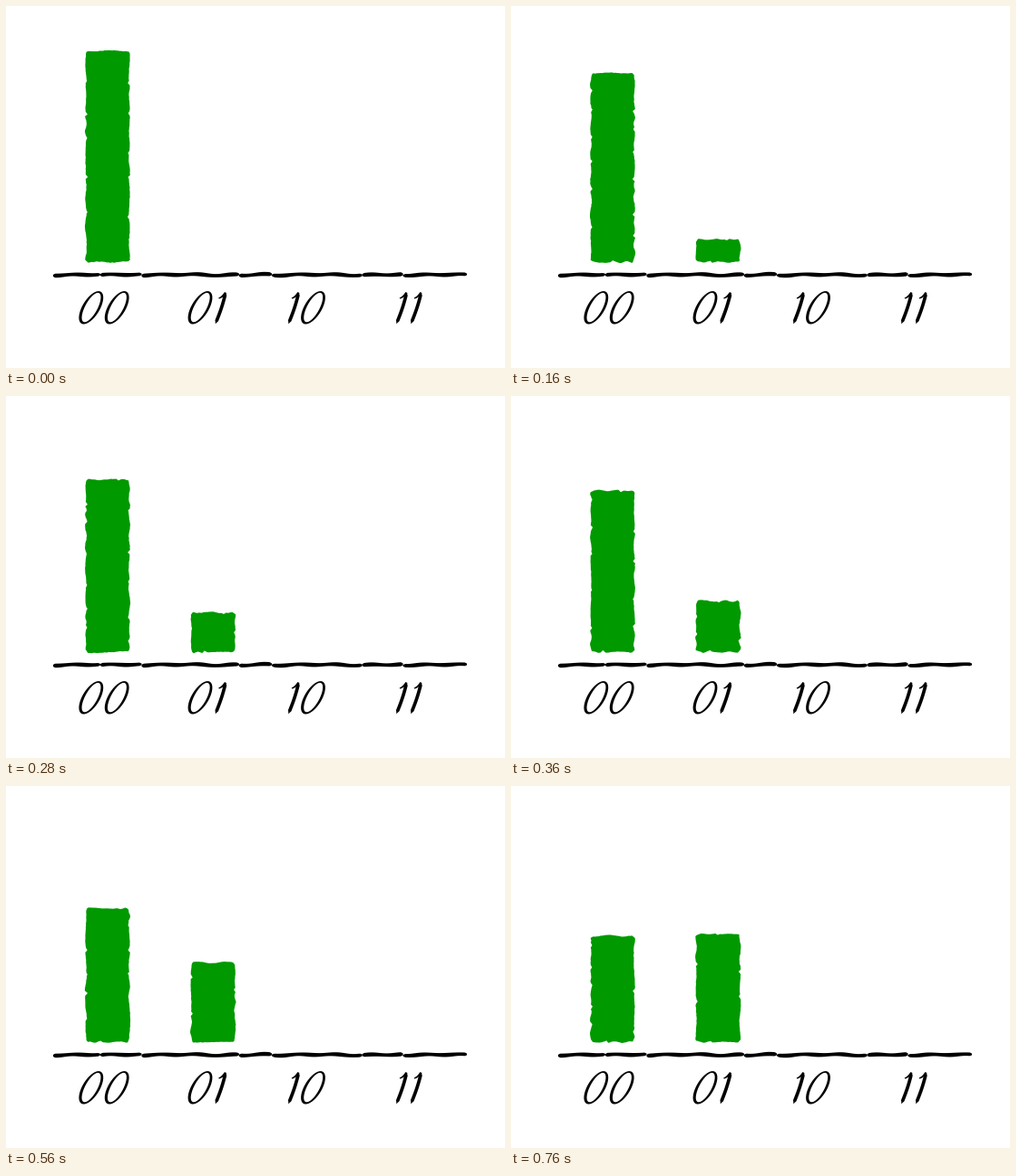
A matplotlib script that plays this animation: 550x400 px, repeating every 2400 ms.

```python
import numpy as np
import matplotlib.pyplot as plt
from matplotlib.animation import FuncAnimation
from matplotlib.patches import PathPatch, Polygon
from matplotlib.path import Path

W, H, DPI = 550, 400, 100
FRAMES, STEP_MS, LAST = 60, 40, 19
GREEN, INK = "#009900", "#000000"
BASE = 283

fig = plt.figure(figsize=(W / DPI, H / DPI), dpi=DPI, facecolor="white")
ax = fig.add_axes([0, 0, 1, 1])
ax.set_xlim(0, W)
ax.set_ylim(H, 0)
ax.axis("off")


def brush(x, y, width):
    """Fill a stroke of varying width along a centre line."""
    dx, dy = np.gradient(x), np.gradient(y)
    n = np.hypot(dx, dy)
    ox, oy = -dy / n * width / 2, dx / n * width / 2
    left = np.column_stack([x + ox, y + oy])
    right = np.column_stack([x - ox, y - oy])[::-1]
    ax.add_patch(Polygon(np.vstack([left, right]), fc=INK, lw=0))


def draw_axis():
    rng = np.random.default_rng(4)
    stops = [52, 104, 149.5, 257, 293, 392.5, 437.5, 508]
    for a, b in zip(stops, stops[1:]):
        x = np.linspace(a, b, 60)
        p, q = rng.uniform(0, 2 * np.pi, 2)
        y = 297 + 0.6 * np.sin(x / 6.5 + p) + 0.4 * np.sin(x / 13 + q)
        edge = np.minimum(x - a, b - x)
        width = 4.1 * np.clip(0.45 + edge / 4, 0, 1) + 0.4 * np.sin(x / 5 + q)
        brush(x, y, width)


def zero(cx):
    t = np.linspace(0, 2 * np.pi, 90)
    c, s = np.cos(t), np.sin(t)

    def ring(a, b, slant, dx, dy):
        return np.column_stack([cx + dx + a * c + slant * s, 333.3 + dy - b * s])

    outer = ring(10.6, 18.2, 8.2, 0, 0)
    inner = ring(7.5, 16.2, 7.3, 0.2, -0.2)[::-1]
    path = Path.make_compound_path(Path(outer, closed=True), Path(inner, closed=True))
    ax.add_patch(PathPatch(path, fc=INK, lw=0))


def one(x0):
    t = np.linspace(0, 1, 40)
    ends = np.clip(np.minimum(t, 1 - t) * 12, 0.3, 1)
    brush(x0 + 2 + 11.2 * t + 0.8 * np.sin(np.pi * t), 350.7 - 34 * t, 3.7 * ends)
    brush(x0 + 13 - 7.5 * t, 316.8 + 6.2 * t + np.sin(np.pi * t), 2.6 * (1 - 0.5 * t))


def side(rng, length):
    """Position along an edge and its inward offset, with nicks between strokes."""
    pos, off, start = [], [], 0.0
    while start < length:
        end = start + rng.uniform(18, 46)
        if length - end < 9:
            end = length
        n = max(5, int((end - start) / 2))
        u = np.linspace(0, 1, n)
        waves = rng.uniform(0.6, 1.8)
        wob = rng.uniform(0.3, 1.0) * np.sin(2 * np.pi * (waves * u + rng.random()))
        wob += rng.normal(0, 0.15, n)
        wob[[0, -1]] = rng.uniform(0.8, 2.0, 2)
        pos.append(start + 0.4 + (end - start - 0.8) * u)
        off.append(wob)
        start = end
    return np.concatenate(pos), np.concatenate(off)


def rough_bar(left, right, top, seed):
    rng = np.random.default_rng(seed)
    w, h = right - left, BASE - top
    k = min(1, h / 10)
    p, o = side(rng, w)
    up = np.column_stack([left + p, top + k * o])
    p, o = side(rng, h)
    rt = np.column_stack([right - o, top + p])
    p, o = side(rng, w)
    dn = np.column_stack([right - p, BASE - k * o])
    p, o = side(rng, h)
    lt = np.column_stack([left + o, BASE - p])
    return np.vstack([up, rt, dn, lt])


draw_axis()
for x in (93.8, 122.2, 214, 338.5):
    zero(x)
for x in (229, 309.5, 428.5, 444.5):
    one(x)

bars = [Polygon(np.zeros((3, 2)), fc=GREEN, lw=0) for _ in range(2)]
for bar in bars:
    ax.add_patch(bar)


def update(frame):
    i = min(frame, LAST)
    p = i / LAST
    bars[0].set_xy(rough_bar(88, 136, 49.5 + 116 * p, 100 + i))
    bars[1].set_visible(i > 0)
    if i:
        bars[1].set_xy(rough_bar(204, 252.5, BASE - 119.5 * p, 300 + i))
    return bars


anim = FuncAnimation(fig, update, frames=FRAMES, interval=STEP_MS,
                     init_func=lambda: update(0), repeat=True, repeat_delay=0)
plt.show()
```
